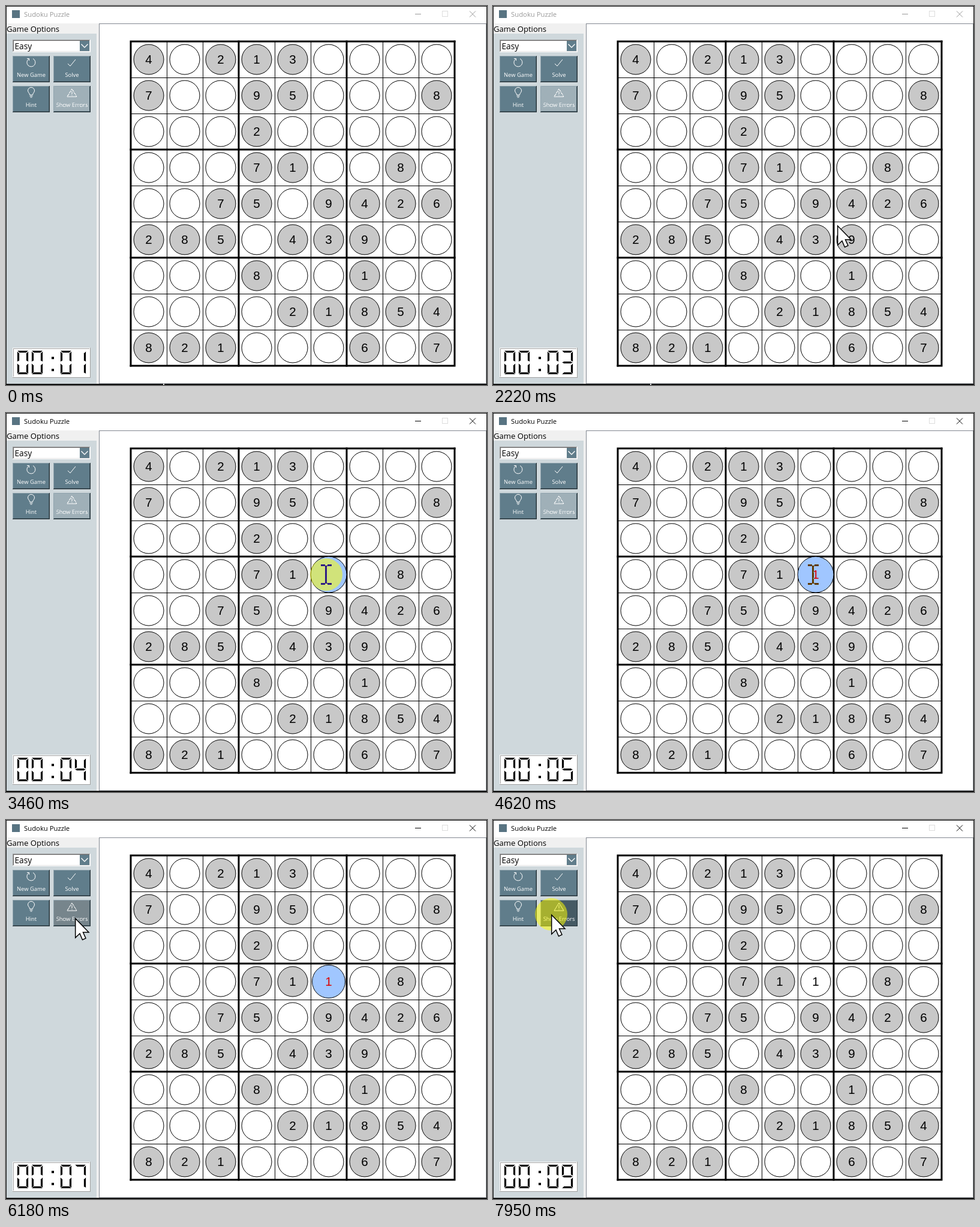
An HTML page for the animation above (8000 ms loop, 802x631 px).

```html
<!DOCTYPE html>
<html lang="en">
<head>
<meta charset="utf-8">
<title>Sudoku Puzzle</title>
<style>
  html, body { margin: 0; width: 100%; height: 100%; overflow: hidden; background: #fff; }
  svg { display: block; width: 802px; height: 631px; }
  text { font-family: "Open Sans", "Noto Sans", sans-serif; }
  .crisp { shape-rendering: crispEdges; }
  .cell text { font: 20.5px "Liberation Sans", Arial, sans-serif; text-anchor: middle; }
  .button text { font-size: 9.4px; fill: #fff; text-anchor: middle; }
  .icon { fill: none; stroke: #fff; stroke-width: 1; }
  .digit { stroke: #fff; stroke-width: .8; }
  #beam { mix-blend-mode: difference; fill: #fff; }
</style>
</head>
<body>
<svg id="stage" viewBox="0 0 802 631" xmlns="http://www.w3.org/2000/svg"></svg>
<script>
const LOOP = 8000;
const PUZZLE = ['4.213....', '7..95...8', '...2.....', '...71..8.', '..75.9426',
                '285.439..', '...8..1..', '....21854', '821...6.7'];
const CELL = 60, LEFT = 208, TOP = 59;
const SECOND = 990, CLOCK_LEAD = 220, GROW_TIME = 150, CLICK_TIME = 70;

// Lit segments of each numeral; 0 top, 1-2 upper sides, 3 middle, 4-5 lower sides, 6 bottom.
const NUMERALS = '012456 25 02346 02356 1235 01356 013456 025 0123456 012356'.split(' ');

const MOVES = [
  { begin: 1280, end: 1900, from: [741, 620], to: [596, 416], lead: 1, power: 2.4, sag: 0 },
  { begin: 2040, end: 2750, from: [596, 416], to: [534, 269], lead: 1.2, power: 2, sag: 0 },
  { begin: 5470, end: 6410, from: [534, 269], to: [97, 157], lead: 1.3, power: 2.67, sag: 9 }
];
const SELECT = 3460, TYPED = 4620, UNCHECK = 6720, PRESS = 7950;

const clamp = v => Math.max(0, Math.min(1, v));
const range = n => [...Array(n).keys()];
const centerX = col => LEFT + CELL * (col + .5);
const centerY = row => TOP + CELL * (row + .5);

function pointerAt(t) {
  const move = MOVES.filter(m => m.begin <= t).pop();
  if (!move) return null;
  const p = clamp((t - move.begin) / (move.end - move.begin));
  const e = 1 - (1 - p ** move.lead) ** move.power;
  const [x, y] = [0, 1].map(i => move.from[i] + (move.to[i] - move.from[i]) * e);
  return { x, y: y + 4 * move.sag * e * (1 - e) };
}

const inCell = (point, { col, row }) =>
  point && Math.hypot(point.x - centerX(col), point.y - centerY(row)) < CELL / 2;

const rect = (x, y, w, h, fill, more = '') =>
  `<rect x="${x}" y="${y}" width="${w}" height="${h}" fill="${fill}" ${more}/>`;
const edge = (d, color) => `<path class="crisp" d="${d}" fill="none" stroke="${color}"/>`;

function bevel(x, y, w, h, topLeft, bottomRight) {
  return edge(`M${x + .5} ${y + h}V${y + .5}H${x + w}`, topLeft) +
         edge(`M${x} ${y + h - .5}H${x + w - .5}V${y}`, bottomRight);
}

function button(x, y, label, icon, id = '') {
  return `<g class="button">${rect(x, y, 62, 44, '#607d8b', id && `id="${id}"`)}
    ${bevel(x, y, 62, 44, '#90a4ae', '#263238')}${bevel(x + 1, y + 1, 60, 42, 'none', '#455a64')}
    <path class="icon" transform="translate(${x + 31} ${y + 11})" d="${icon}"/>
    <text x="${x + 31}" y="${y + 35}">${label}</text></g>`;
}

function checker(id, dark, light) {
  return `<pattern id="${id}" width="2" height="2" patternUnits="userSpaceOnUse" class="crisp">
    ${rect(0, 0, 2, 2, dark)}${rect(0, 0, 1, 1, light)}${rect(1, 1, 1, 1, light)}</pattern>`;
}

function windowFrame() {
  return rect(0, 0, 802, 631, '#fff') +
    rect(1, 29, 154, 600, '#f0f0f0') +
    rect(1, 46, 150, 583, '#cfd8dc') +
    edge('M155.5 629V29.5H801', '#828790') +
    edge('M156 628.5H800.5V30', '#a0a4aa') +
    edge('M.5 631V.5H801.5V631', '#1a1a1a') +
    rect(0, 629, 802, 2, '#111') +
    rect(262, 629, 2, 2, '#ddd', 'id="tick"') +
    rect(10, 7, 13, 13, '#587482') +
    `<g id="caption"><text x="30" y="18" font-size="11.3">Sudoku Puzzle</text>
      <path d="M682 13.5H692M773 8.5L783 18.5M783 8.5L773 18.5" fill="none" stroke="currentColor"/></g>` +
    edge('M727.5 8.5H736.5V17.5H727.5Z', '#ddd') +
    '<text x="1" y="43" font-size="13.1">Game Options</text>';
}

function sidebar() {
  return rect(11, 56, 130, 21, '#fff') +
    bevel(11, 56, 130, 21, '#a0a0a0', '#fff') + bevel(12, 57, 128, 19, '#696969', '#e3e3e3') +
    rect(123, 58, 16, 17, '#607d8b') +
    '<path class="icon" style="stroke-width:1.3" d="M125.5 63.5L131 69L136.5 63.5"/>' +
    '<text x="14.5" y="72" font-size="13.7">Easy</text>' +
    button(11, 83, 'New Game', 'M-4.5 -5.5A7 7 0 1 0 3 -6.3M-7 -6.5H-3.5V-3') +
    button(79, 83, 'Solve', 'M-7 2L-3 6L6 -5') +
    button(11, 133, 'Hint', 'M-2.5 4C-2.5 1 -5.5 0 -5.5 -3A5.5 5.5 0 0 1 5.5 -3C5.5 0 2.5 1 2.5 4ZM-2.5 6H2.5M-1.5 8H1.5') +
    button(79, 133, 'Show Errors', 'M0 -6L8 7H-8ZM0 -2V3M0 4.5V5.5', 'errors');
}

function clock() {
  const top = 'M0 0H19L15 4H4Z', middle = 'M0 20L4 18H15L19 20L15 22H4Z', side = 'M0 1L4 5V17L0 19Z';
  const bar = (d, place = '') => `<path d="${d}" transform="${place}"/>`;
  const sides = y => bar(side, `translate(0 ${y})`) + bar(side, `translate(19 ${y}) scale(-1 1)`);
  const numeral = bar(top) + sides(0) + bar(middle) + sides(20) + bar(top, 'translate(0 40) scale(1 -1)');
  const digits = [0, 1, 3, 4].map(slot =>
    `<g class="digit" transform="translate(${18.5 + 24 * slot} 573.5)">${numeral}</g>`).join('');
  return rect(11, 569, 130, 50, '#fff') +
    bevel(11, 569, 130, 50, '#fff', '#a0a0a0') + bevel(12, 570, 128, 48, '#a0a0a0', '#fff') +
    rect(76, 584, 4, 4, '#000') + rect(76, 604, 4, 4, '#000') + digits;
}

const cells = PUZZLE.flatMap((line, row) => [...line].map((value, col) => ({ col, row, value })));
const blanks = cells.filter(cell => cell.value === '.');
const chosen = blanks.find(cell => cell.col === 5 && cell.row === 3);

function board() {
  const gridLine = i => {
    const x = LEFT + CELL * i, y = TOP + CELL * i, size = CELL * 9;
    return i % 3
      ? edge(`M${x + .5} ${TOP}v${size}M${LEFT} ${y + .5}h${size}`, '#000')
      : `<path d="M${x} ${TOP - 1.5}v${size + 3}M${LEFT - 1.5} ${y}h${size + 3}" stroke="#000" stroke-width="3"/>`;
  };
  const drawCell = cell => {
    const x = centerX(cell.col), y = centerY(cell.row), blank = cell.value === '.';
    const text = cell === chosen ? '1' : blank ? '' : cell.value;
    return `<g class="cell"><circle cx="${x}" cy="${y}" r="25" stroke="#000" fill="${blank ? '#fff' : '#c8c8c8'}"/>
      <text x="${x}" y="${y + 7}">${text}</text></g>`;
  };
  return range(10).map(gridLine).join('') + cells.map(drawCell).join('');
}

const stage = document.getElementById('stage');
stage.innerHTML =
  `<defs>${checker('checked', '#607d8b', '#dfe3e5')}${checker('checkedHover', '#455a64', '#a8b0b4')}</defs>` +
  windowFrame() + sidebar() + clock() + board() +
  `<circle id="halo" r="27" fill="#ff0" fill-opacity=".52"/>
   <path id="arrow" d="M.7 1V33L8 26L12.5 36.5L18 34L13.5 24H23Z" fill="#fff" stroke="#000" stroke-width="1.5"/>
   <path id="beam" class="crisp" d="M-9 -17H-2V-14H-9ZM2 -17H9V-14H2ZM-2 -15H2V-14H-2ZM-2 -14H1V14H-2ZM-2 14H2V15H-2ZM-9 14H-2V17H-9ZM2 14H9V17H2Z"/>`;

const el = id => document.getElementById(id);
const show = (node, on) => node.setAttribute('visibility', on ? 'visible' : 'hidden');
const digits = [...document.querySelectorAll('.digit')];
const cellNodes = [...document.querySelectorAll('.cell')];
cells.forEach((cell, i) => [cell.circle, cell.text] = cellNodes[i].children);

function setDigit(digit, value) {
  [...digit.children].forEach((bar, i) => show(bar, NUMERALS[value].includes(i)));
}
digits.forEach(digit => setDigit(digit, 0));

// A cell grows with the share of the recent past that the pointer spent in it.
function drawCells(t) {
  const focused = t >= SELECT && t < UNCHECK;
  const trail = range(10).map(i => pointerAt(t - (i + .5) * GROW_TIME / 10));
  for (const cell of blanks) {
    const hover = trail.filter(point => inCell(point, cell)).length / trail.length;
    const focus = focused && cell === chosen ? 1 : 0;
    cell.circle.setAttribute('r', 25 + 2.5 * (hover + focus));
  }
  chosen.circle.setAttribute('fill', focused ? '#a0c6ff' : '#fff');
  chosen.text.setAttribute('fill', t < UNCHECK + CLICK_TIME ? '#dc0000' : '#000');
  show(chosen.text, t >= TYPED);
}

function drawPointer(t, point) {
  const overBlank = blanks.some(cell => inCell(point, cell));
  const { x, y } = point || { x: 0, y: 0 };
  const place = `translate(${Math.round(x)} ${Math.round(y)})`;
  for (const id of ['arrow', 'beam', 'halo']) el(id).setAttribute('transform', place);
  show(el('arrow'), point && !overBlank);
  show(el('beam'), overBlank);
  show(el('halo'), [SELECT, UNCHECK, PRESS].some(click => t >= click && t < click + CLICK_TIME));
}

function draw(t) {
  const point = pointerAt(t);
  const color = t >= SELECT ? '#000' : '#999';
  const overButton = point && point.x < 141 && point.y < 177;
  const face = t >= UNCHECK + CLICK_TIME ? '#455a64' : overButton ? 'url(#checkedHover)' : 'url(#checked)';
  el('caption').setAttribute('fill', color);
  el('caption').setAttribute('color', color);
  el('errors').setAttribute('fill', face);
  show(el('tick'), t < SELECT);
  setDigit(digits[3], 1 + Math.floor((t + CLOCK_LEAD) / SECOND));
  drawCells(t);
  drawPointer(t, point);
}

const start = performance.now();
function frame() {
  draw((performance.now() - start) % LOOP);
  requestAnimationFrame(frame);
}
frame();
</script>
</body>
</html>
```
